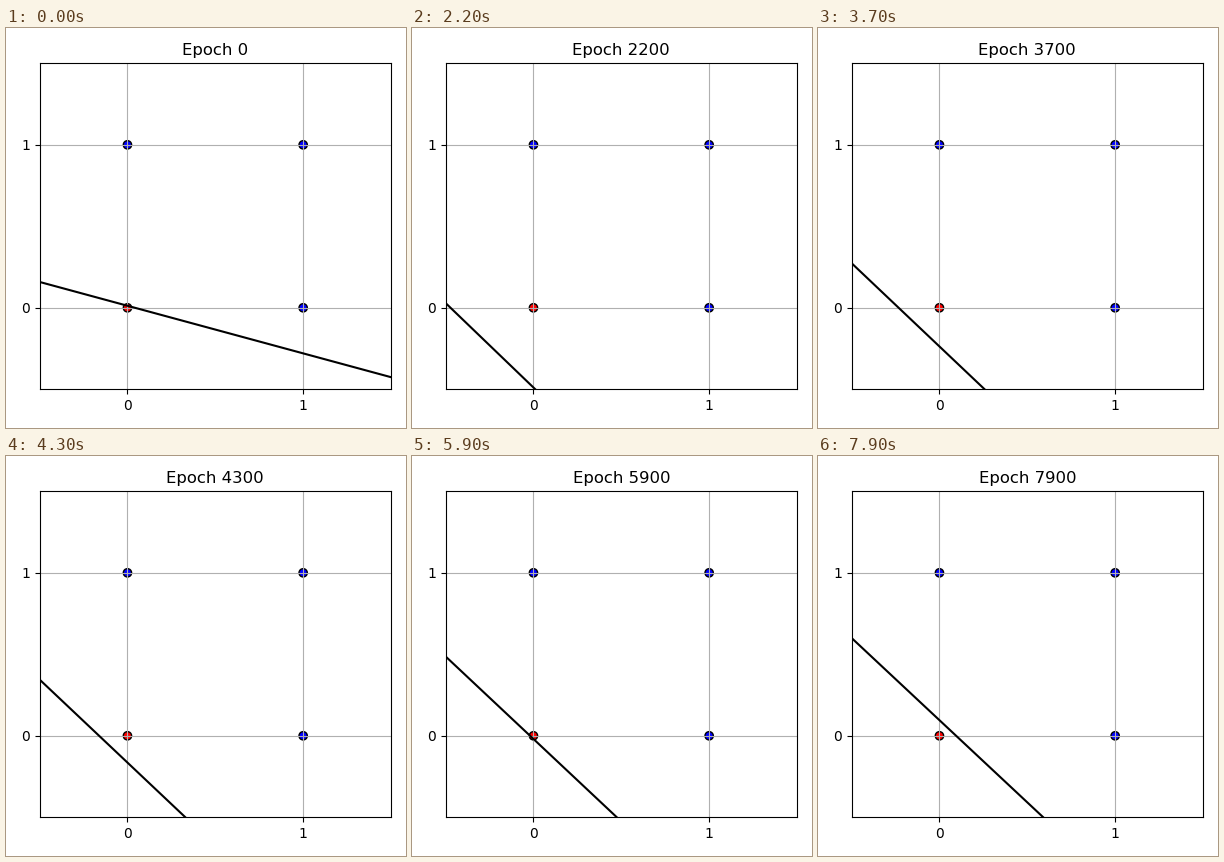
A matplotlib script that plays this animation: 400 px wide and 400 px high, repeating every 8000 ms.

```python
import numpy as np
import matplotlib.pyplot as plt
from matplotlib.animation import FuncAnimation

FRAMES, INTERVAL, STRIDE = 80, 100, 100
RATE = 0.000797

# Logical OR, with a constant column for the bias
X = np.array([[0, 0, 1], [0, 1, 1], [1, 0, 1], [1, 1, 1]], float)
y = np.array([0, 1, 1, 1], float)


def train():
    """Logistic regression by gradient descent; weights at every shown epoch."""
    w = np.array([-0.0187, -0.064, 0.0008])
    shown = []
    for epoch in range(FRAMES * STRIDE):
        if epoch % STRIDE == 0:
            shown.append(w.copy())
        p = 1 / (1 + np.exp(-X @ w))
        w += RATE * X.T @ (y - p)
    return shown


weights = train()

fig, ax = plt.subplots(figsize=(4, 4), dpi=100)
ax.scatter(X[:, 0], X[:, 1], s=36, c=["blue" if t else "red" for t in y],
           edgecolors="black", linewidths=1)
ax.set(xlim=(-0.5, 1.5), ylim=(-0.5, 1.5), xticks=[0, 1], yticks=[0, 1])
ax.grid(True)
# Just under 12 pt, so that hinting rounds the glyphs down to 16 px
title = ax.set_title("Epoch 0", fontsize=11.87)
span = np.array([-0.5, 1.5])
line, = ax.plot(span, span, color="black", lw=1.5)
fig.tight_layout()


def update(i):
    w1, w2, b = weights[i]
    line.set_data(span, -(w1 * span + b) / w2)
    title.set_text(f"Epoch {i * STRIDE}")
    return line, title


anim = FuncAnimation(fig, update, frames=FRAMES, interval=INTERVAL, repeat=True)
plt.show()
```
